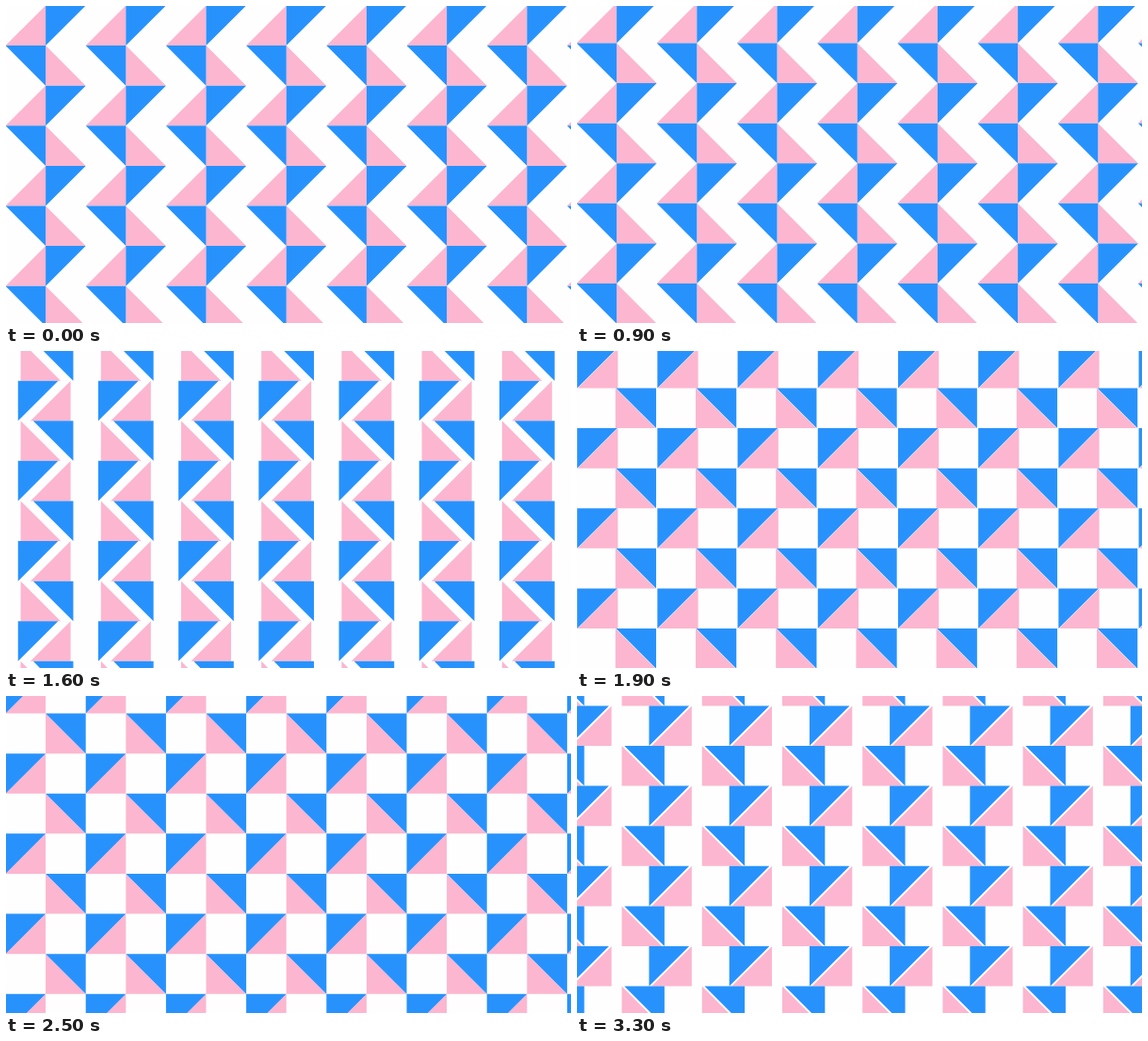
Write an HTML page with a canvas that moves like this. It is 600 px wide and 337 px high and loops after 3400 ms.

```html
<!DOCTYPE html>
<html lang="en">
<head>
<meta charset="utf-8">
<title>Sliding triangles</title>
<style>
  html, body { margin: 0; width: 100%; height: 100%; overflow: hidden; background: #fefefe; }
  canvas { display: block; }
</style>
</head>
<body>
<canvas id="stage" width="600" height="337"></canvas>
<script>
const ctx = document.getElementById('stage').getContext('2d');
const W = 600, H = 337;
const LOOP = 3400, STEP = 100, PHASE = 1000, DELAY = 41;
const CELL = 42.6, PERIOD = 2 * CELL, ORIGIN = -0.5;
const BLUE = '#2892fc', PINK = '#fcb6d0';

const bez = (u, a, b) => 3 * (1 - u) ** 2 * u * a + 3 * (1 - u) * u * u * b + u ** 3;
const wrap = v => ((v % PERIOD) + PERIOD) % PERIOD;

// cubic-bezier(.72, 0, .28, 1)
function ease(t) {
  let lo = 0, hi = 1;
  for (let i = 0; i < 24; i++) {
    const mid = (lo + hi) / 2;
    if (bez(mid, 0.72, 0.28) < t) lo = mid; else hi = mid;
  }
  return bez(lo, 0, 1);
}

// One row of right triangles; corners are given in cell units.
function row(x, y, color, corners) {
  ctx.fillStyle = color;
  ctx.beginPath();
  for (let left = wrap(x) - PERIOD; left < W; left += PERIOD) {
    for (const [cx, cy] of corners) ctx.lineTo(left + cx * CELL, y + cy * CELL);
    ctx.closePath();
    ctx.moveTo(left + PERIOD + corners[0][0] * CELL, y + corners[0][1] * CELL);
  }
  ctx.fill();
}

function draw(ms) {
  const clock = Math.max(0, ms - DELAY) / PHASE;
  const phase = Math.floor(clock);
  const p = ease(clock - phase);

  // Horizontal travel in cells: zigzag -> checks, then checks -> zigzag.
  const blue = [0, p, 1, 1 + 3 * p][phase] * CELL;
  const pink = [0, 2 * p, 2, 2 + 2 * p][phase] * CELL;

  ctx.fillStyle = '#fefefe';
  ctx.fillRect(0, 0, W, H);

  const top = ORIGIN + wrap(4 * CELL * p) - PERIOD;
  for (let y = top; y < H; y += PERIOD) {
    row(ORIGIN - pink, y, PINK, [[1, 0], [1, 1], [0, 1]]);
    row(ORIGIN + CELL - blue, y, BLUE, [[0, 0], [1, 0], [0, 1]]);
    row(ORIGIN + CELL + pink, y + CELL, PINK, [[0, 0], [1, 1], [0, 1]]);
    row(ORIGIN + blue, y + CELL, BLUE, [[0, 0], [1, 0], [1, 1]]);
  }
}

const start = performance.now();
function tick() {
  const ms = (performance.now() - start) % LOOP;
  draw(Math.floor(ms / STEP) * STEP);
  requestAnimationFrame(tick);
}
tick();
</script>
</body>
</html>
```
